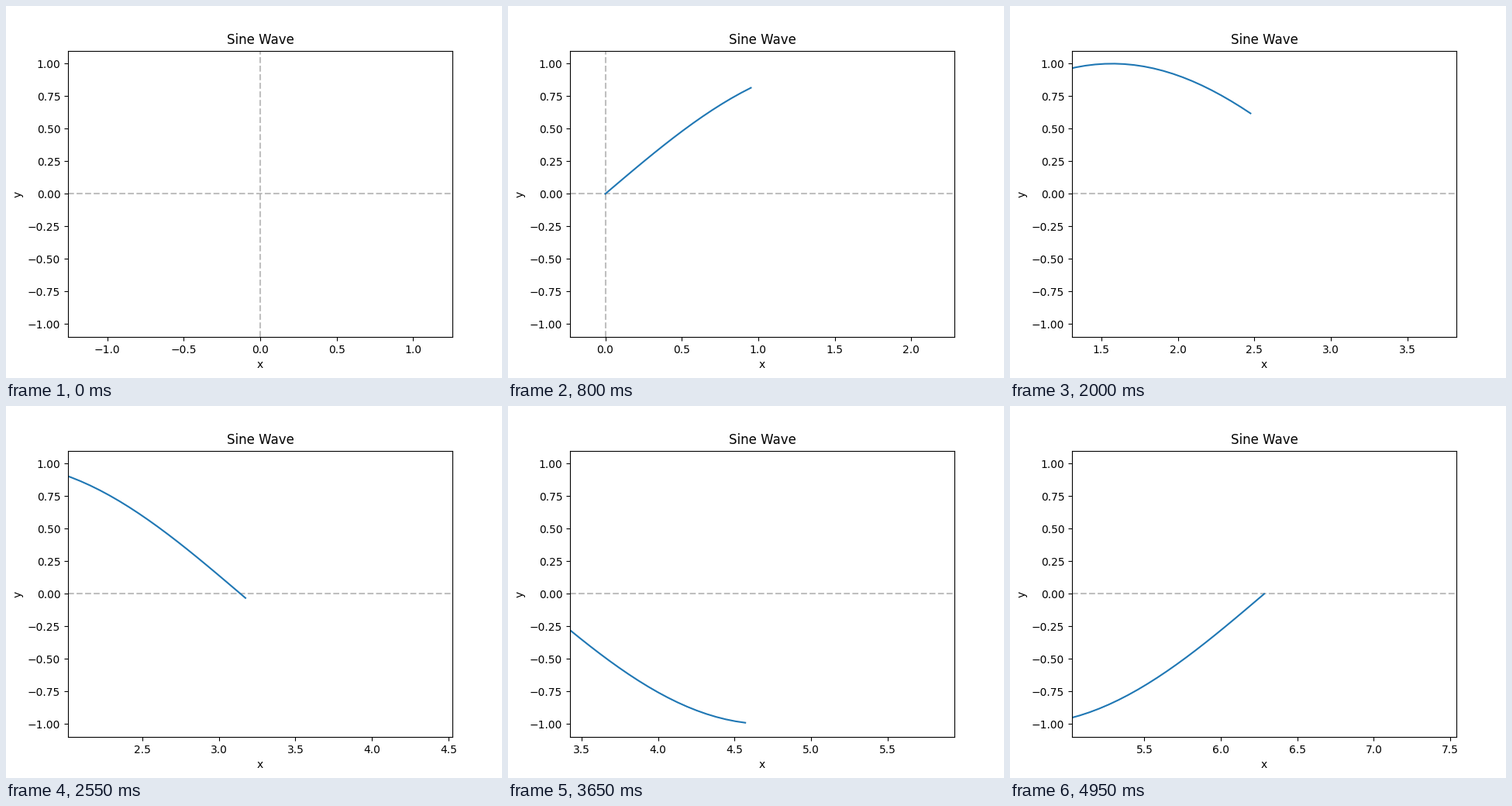
Animation, 640 px wide and 480 px high, one loop 5 s. Source, as a matplotlib script:

```python
import numpy as np
import matplotlib.pyplot as plt
from matplotlib.animation import FuncAnimation

FRAMES = 100
INTERVAL = 50
END = 2 * np.pi
HALF_VIEW = 0.2 * END

x = np.linspace(0, END, FRAMES)
y = np.sin(x)

fig, ax = plt.subplots(figsize=(6.4, 4.8), dpi=100)
ax.set_title("Sine Wave")
ax.set_xlabel("x")
ax.set_ylabel("y")
ax.set_xlim(-HALF_VIEW, HALF_VIEW)
ax.set_ylim(-1.1, 1.1)

guide = dict(color="gray", linestyle="--", alpha=0.5)
ax.axhline(0, **guide)
ax.axvline(0, **guide)
wave, = ax.plot([], [], color="tab:blue")


def update(i):
    # The last step closes the full period.
    count = FRAMES if i == FRAMES - 1 else i
    wave.set_data(x[:count], y[:count])
    center = min(END * i / (FRAMES - 2), END)
    ax.set_xlim(center - HALF_VIEW, center + HALF_VIEW)
    return wave,


anim = FuncAnimation(fig, update, frames=FRAMES, interval=INTERVAL,
                     repeat=True, repeat_delay=0, blit=False)
plt.show()
```
